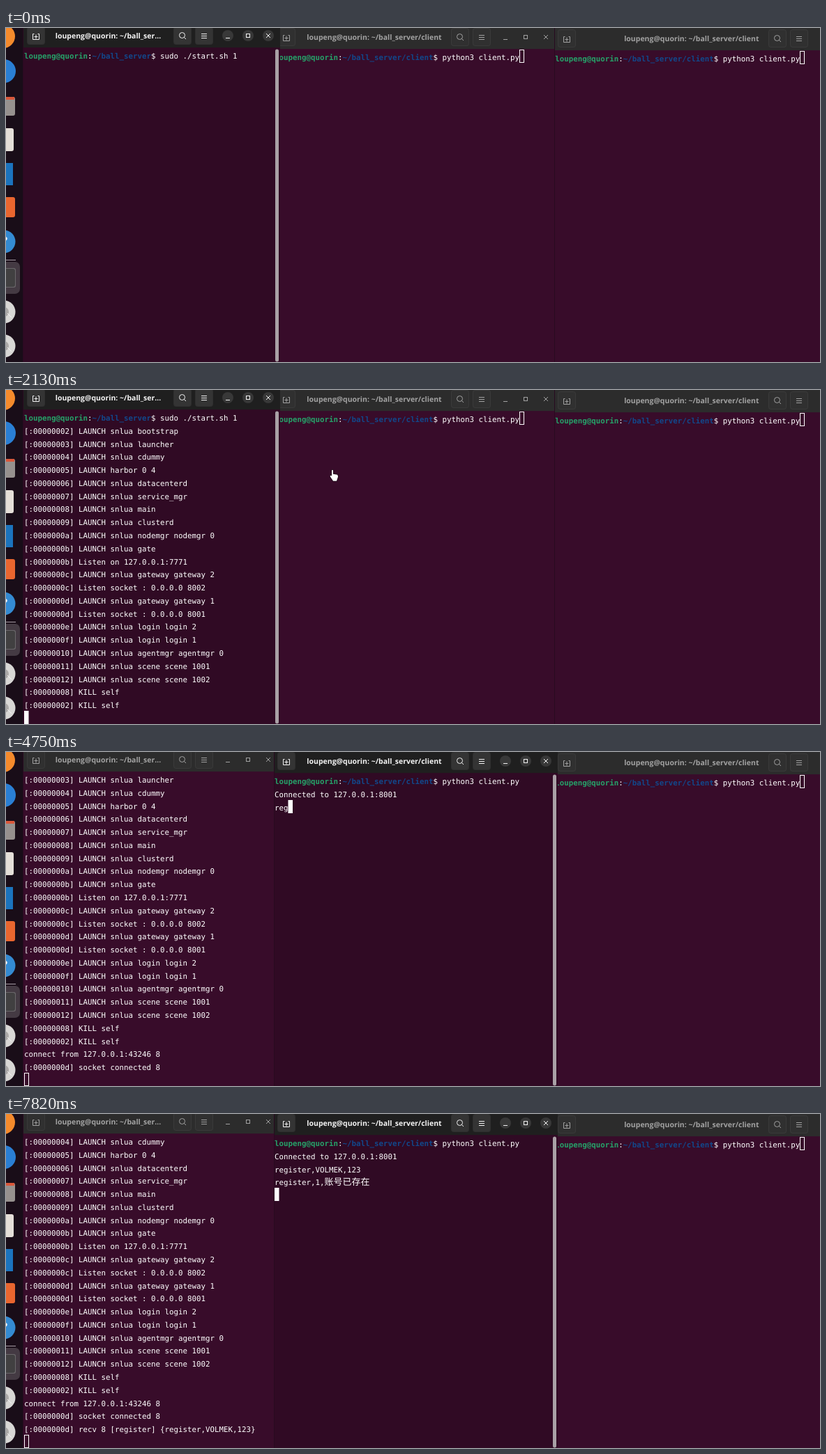
An HTML page with a canvas for the animation above (8 s loop, 1167 by 480 pixels).

```html
<!DOCTYPE html>
<html lang="en">
<head>
<meta charset="utf-8">
<title>Terminals</title>
<style>
html, body { margin: 0; width: 100%; height: 100%; overflow: hidden; background: #190d18; }
canvas { display: block; }
</style>
</head>
<body>
<canvas id="stage" width="1167" height="480"></canvas>
<script>
const ctx = document.getElementById('stage').getContext('2d');
const LOOP = 8000, CELL = 6.5, ROW = 18.77, ROWS = 24;
const MONO = '10.8px "DejaVu Sans Mono", monospace';
const CJK = '13px "Noto Sans CJK SC", "Noto Sans CJK", sans-serif';
const TITLE = 'bold 10.5px "Open Sans", "Noto Sans", sans-serif';
const GREEN = '#26a269', BLUE = '#12488b', WHITE = '#fff';
const HOST = 'loupeng@quorin';
const TYPED = 'register,VOLMEK,123';

const ENTER_SERVER = 1480, FOCUS = 2300, ENTER_CLIENT = 2560, CONNECT = 2730, REPLY = 7820;
const KEYS = [4480, 4640, 4750, 4960, 5020, 5230, 5320, 5500, 5650, 5950,
  6160, 6290, 6470, 6620, 6780, 7110, 7380, 7470, 7640];

const BOOT = `02 LAUNCH snlua bootstrap
03 LAUNCH snlua launcher
04 LAUNCH snlua cdummy
05 LAUNCH harbor 0 4
06 LAUNCH snlua datacenterd
07 LAUNCH snlua service_mgr
08 LAUNCH snlua main
09 LAUNCH snlua clusterd
0a LAUNCH snlua nodemgr nodemgr 0
0b LAUNCH snlua gate
0b Listen on 127.0.0.1:7771
0c LAUNCH snlua gateway gateway 2
0c Listen socket : 0.0.0.0 8002
0d LAUNCH snlua gateway gateway 1
0d Listen socket : 0.0.0.0 8001
0e LAUNCH snlua login login 2
0f LAUNCH snlua login login 1
10 LAUNCH snlua agentmgr agentmgr 0
11 LAUNCH snlua scene scene 1001
12 LAUNCH snlua scene scene 1002
08 KILL self
02 KILL self`.split('\n').map(logLine);

// Pointer paths: [time, x, y]
const ARRIVE = [[180, 899, 449], [400, 486, 324], [660, 254, 140], [780, 249, 149]];
const LEAVE = [[1710, 249, 149], [1980, 392, 132], [2300, 600, 107]];

const server = { x: 24, right: 393, textX: 26, top: 29.1, mid: 11, tab: 43, title: 146.5,
  name: '~/ball_ser...', search: 253 };
const client = { x: 384, right: 791, textX: 385, top: 31.1, mid: 13, tab: 402, title: 528,
  name: '~/ball_server/client', search: 651 };
const spare = { x: 786, right: 1200, textX: 787.2, top: 33.1, mid: 15, tab: 804, title: 982.8,
  name: '~/ball_server/client', search: 1106 };

function logLine(s) { return '[:000000' + s.slice(0, 2) + ']' + s.slice(2); }

function rect(x, y, w, h, color) {
  ctx.fillStyle = color;
  ctx.fillRect(x, y, w, h);
}

function round(x, y, w, h, r, color) {
  ctx.fillStyle = color;
  ctx.beginPath();
  ctx.roundRect(x, y, w, h, r);
  ctx.fill();
}

function disc(x, y, r, color) {
  ctx.fillStyle = color;
  ctx.beginPath();
  ctx.arc(x, y, r, 0, 7);
  ctx.fill();
}

// Strokes polylines given as flat [x, y, x, y, ...] lists
function lines(color, ...paths) {
  ctx.strokeStyle = color;
  ctx.lineWidth = 1;
  ctx.beginPath();
  for (const p of paths)
    for (let i = 0; i < p.length; i += 2) ctx[i ? 'lineTo' : 'moveTo'](p[i], p[i + 1]);
  ctx.stroke();
}

function text(s, x, y, font, color, align = 'left') {
  ctx.font = font;
  ctx.fillStyle = color;
  ctx.textAlign = align;
  ctx.fillText(s, x, y);
}

function write(win, row, col, s, color = WHITE, font = MONO) {
  text(s, win.textX + col * CELL, win.top + row * ROW + 15, font, color);
}

function prompt(win, path, command) {
  let col = 0;
  for (const [s, color, weight] of [[HOST, GREEN, 'bold '], [':', WHITE, ''],
    [path, BLUE, 'bold '], ['$ ' + command, WHITE, '']]) {
    write(win, 0, col, s, color, weight + MONO);
    col += s.length;
  }
}

function cursor(win, row, col, solid) {
  const x = win.textX + col * CELL, y = Math.round(win.top + row * ROW);
  if (solid) return rect(x, y, CELL, 19, WHITE);
  ctx.strokeStyle = WHITE;
  ctx.lineWidth = 1;
  ctx.strokeRect(Math.round(x) + .5, y + .5, 6, 18);
}

function header(win, active) {
  const { mid, tab, search } = win, y = mid + .5, menu = search + 31;
  const ink = active ? '#f4f4f4' : '#a2a2a2';
  rect(win.x, 0, win.right - win.x, win.top - 1, active ? '#1f1f1f' : '#2c2c2c');
  for (const x of [tab, search, menu]) {
    round(x - 13, mid - 13, 26, 26, 4, active ? '#2f2f2f' : '#3a3a3a');
    round(x - 12, mid - 12, 24, 24, 3, active ? '#343434' : '#303030');
  }
  const t = tab + .5, b = y + 1;
  lines(ink, [t - 3, b - 4, t - 5, b - 4, t - 5, b + 4, t + 4, b + 4, t + 4, b - 4, t + 2, b - 4],
    [t - 3, b, t + 2, b], [t - .5, b - 3, t - .5, b + 3]);
  ctx.beginPath();
  ctx.arc(search - .5, mid - .5, 4, 0, 7);
  ctx.stroke();
  lines(ink, [search + 2.3, mid + 2.3, search + 5, mid + 5]);
  lines(ink, ...[-3, 0, 3].map(d => [menu - 4, y + d, menu + 4, y + d]));

  const [min, max, close] = [65, 94, 123].map(d => search + d);
  if (active) for (const x of [min, max, close]) disc(x, mid, 8, '#383838');
  lines(ink, [min - 3, y + 3, min + 3, y + 3],
    [close - 3, mid - 3, close + 3, mid + 3], [close + 3, mid - 3, close - 3, mid + 3]);
  ctx.strokeRect(max - 2.5, mid - 2.5, 5, 5);
  text(HOST + ': ' + win.name, win.title, mid + 3.8, TITLE, ink, 'center');
}

function drawWindow(win, active, content) {
  ctx.save();
  ctx.beginPath();
  ctx.rect(win.x, 0, win.right - win.x, 480);
  ctx.clip();
  rect(win.x, 0, win.right - win.x, 480, active ? '#300a24' : '#380c2a');
  header(win, active);
  rect(win.x, 0, 1, 480, '#280a20');
  if (active) round(win.right - 7, win.top + 1.5, 5, 478 - win.top, 2.5, '#a9a1a6');
  content();
  ctx.restore();
}

function drawServer(t) {
  drawWindow(server, t < FOCUS, () => {
    const log = [null];
    if (t >= ENTER_SERVER) log.push(...BOOT);
    if (t >= CONNECT) log.push('connect from 127.0.0.1:43246 8', logLine('0d socket connected 8'));
    if (t >= REPLY) log.push(logLine(`0d recv 8 [register] {${TYPED}}`));
    log.slice(1 - ROWS).forEach((s, row) => {
      if (s) write(server, row, 0, s);
      else prompt(server, '~/ball_server', 'sudo ./start.sh 1');
    });
    if (t >= ENTER_SERVER) cursor(server, ROWS - 1, 0, t < FOCUS);
    else if (t >= 210 && t < 810 || t >= 1380) cursor(server, 0, 47, true);
  });
}

function drawClient(t) {
  drawWindow(client, t >= FOCUS, () => {
    prompt(client, client.name, 'python3 client.py');
    if (t < ENTER_CLIENT) return cursor(client, 0, 54, t >= FOCUS);
    if (t < CONNECT) return cursor(client, 1, 0, true);
    const count = KEYS.filter(k => k <= t).length;
    write(client, 1, 0, 'Connected to 127.0.0.1:8001');
    write(client, 2, 0, TYPED.slice(0, count));
    if (t >= REPLY) {
      write(client, 3, 0, 'register,1,');
      write(client, 3, 11, '账号已存在', WHITE, CJK);
      return cursor(client, 4, 0, true);
    }
    const blinkOff = t >= 3150 && t < 3750 || t >= 4330 && t < KEYS[0];
    if (!blinkOff) cursor(client, 2, count, true);
  });
}

function drawSpare() {
  drawWindow(spare, false, () => {
    prompt(spare, spare.name, 'python3 client.py');
    cursor(spare, 0, 54, false);
  });
}

function drawDock() {
  rect(0, 0, 24, 480, '#190d18');
  disc(-4, 12, 17, '#f58a2c');
  disc(-3, 62, 17, '#2a7fd4');
  round(-20, 99, 33, 27, 3, '#96918e');
  rect(-20, 99, 32, 4, '#d9573a');
  round(-20, 144, 31, 33, 3, '#e4dfd8');
  rect(-20, 194, 30, 32, '#1b74bd');
  round(-20, 243, 33, 29, 3, '#e9662f');
  disc(-3, 307, 16.5, '#348bd2');
  text('?', -2, 312, 'bold 17px "Open Sans", sans-serif', WHITE, 'center');
  rect(0, 333, 14, 1, '#a79ea6');
  round(-10, 336, 30, 46, 7, '#443a43');
  round(-20, 345, 34, 28, 3, '#6a676a');
  round(-20, 346, 33, 26, 3, '#414041');
  for (const y of [408, 457]) {
    disc(-3, y, 16.5, '#d8d7d5');
    disc(-3, y, 7, '#aaa8a7');
    lines('#f3f3f3', [2, y + 2, 8, y + 8]);
  }
}

function along(path, t) {
  t = Math.floor(t / 60) * 60;
  const i = path.findIndex(p => p[0] > t);
  if (i < 0) return path[path.length - 1].slice(1);
  if (!i) return path[0].slice(1);
  const a = path[i - 1], b = path[i], k = (t - a[0]) / (b[0] - a[0]);
  return [a[1] + (b[1] - a[1]) * k, a[2] + (b[2] - a[2]) * k];
}

function drawPointer(t) {
  const path = t >= 180 && t < ENTER_SERVER ? ARRIVE : t >= 1710 && t < ENTER_CLIENT ? LEAVE : null;
  if (!path) return;
  const [x, y] = along(path, t);
  ctx.save();
  ctx.translate(x, y);
  const hand = new Path2D('M-3-7Q-2-9-1-7V-2L5-1Q6 0 6 2L4 8H-1L-5 2Q-6 0-4 0L-3 1Z');
  ctx.strokeStyle = '#1a0814';
  ctx.lineWidth = 1.5;
  ctx.stroke(hand);
  ctx.fillStyle = WHITE;
  ctx.fill(hand);
  ctx.restore();
}

function draw(t) {
  ctx.textRendering = 'geometricPrecision';
  drawDock();
  if (t < FOCUS) {
    drawClient(t);
    drawSpare();
    drawServer(t);
  } else {
    drawServer(t);
    drawSpare();
    drawClient(t);
  }
  drawPointer(t);
}

const start = performance.now();
function tick() {
  draw((performance.now() - start) % LOOP);
  requestAnimationFrame(tick);
}
tick();
</script>
</body>
</html>
```
